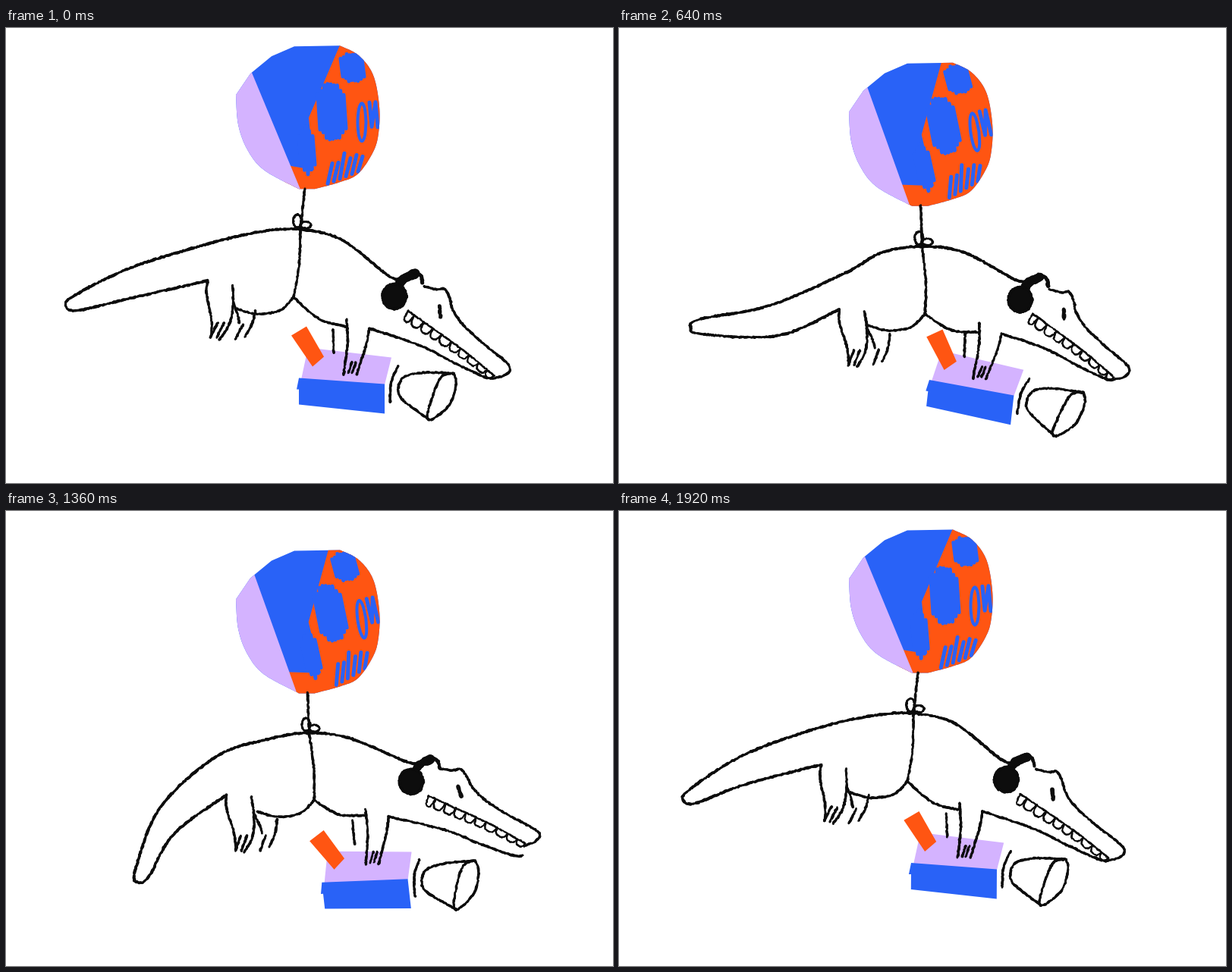
An HTML page with a canvas for the animation above (2000 ms loop, 800 by 600 pixels).

```html
<!DOCTYPE html>
<html lang="en">
<head>
<meta charset="utf-8">
<title>Floating crocodile</title>
<style>
html, body { margin: 0; width: 100%; height: 100%; overflow: hidden; background: #fff; }
canvas { display: block; width: 800px; height: 600px; }
</style>
</head>
<body>
<canvas id="stage" width="800" height="600"></canvas>
<script>
const ctx = document.getElementById('stage').getContext('2d');
const BLUE = '#2962f7', ORANGE = '#ff5512', LILAC = '#d4b3ff', INK = '#0d0d0d';
const LOOP = 2000, RAD = Math.PI / 180;

// Head outlines around the ear: shut along the snout axis, wide in stage axes.
const HEAD = {
  top: {
    shut: [26,-32, 42,-37, 51,-43, 64,-35, 73,-26, 94,-16, 128,-9, 174,-2, 177,11, 165,24],
    wide: [28,-20, 34,-23, 48,-27, 60,-26, 72,-26, 92,-28, 118,-33, 172,-45, 175,-40, 171,-27]
  },
  upperLip: { shut: [25,7, 60,9, 115,13, 165,20], wide: [40,28, 62,9, 120,-13, 171,-27] },
  lowerLip: { shut: [25,7, 60,18, 115,22, 165,24], wide: [40,28, 58,47, 105,74, 153,90] },
  chin: { shut: [64,37, 113,33, 155,28, 165,24], wide: [35,70, 80,87, 145,107, 153,90] },
  eye: { shut: [57,-20, 65,-9], wide: [50,-16, 64,-7] }
};

let seed;
const random = () => {
  seed = (seed * 1664525 + 1013904223) >>> 0;
  return seed / 4294967296;
};
const mix = (a, b, u) => a + (b - a) * u;
const mixPoint = (a, b, u) => [mix(a[0], b[0], u), mix(a[1], b[1], u)];
const shift = ([x, y], dx, dy) => [x + dx, y + dy];
const ramp = (t, from, to) => {
  const u = Math.min(1, Math.max(0, (t - from) / (to - from)));
  return u * u * (3 - 2 * u);
};

// Everything bobs once per loop; lags are degrees, the second pair adds an overtone.
function poseAt(t) {
  const phase = t / LOOP * 2 * Math.PI;
  const wave = (mid, size, lag = 0, size2 = 0, lag2 = 0) =>
    mid - size * Math.cos(phase - lag * RAD) + size2 * Math.cos(2 * phase - lag2 * RAD);
  const sin = Math.sin(phase), rise = (1 - Math.cos(phase)) / 2;
  const open = ramp(t, 740, 1040) * (1 - ramp(t, 1200, 1400));
  const knot = [wave(396, 8), wave(283, 17.5, 8)];
  return {
    open, knot, rise,
    ballTop: wave(41, 18, 10),
    belly: [wave(397, 18, 5), wave(372, 17, 8)],
    hind: [wave(283, 17), wave(361, 28, 4)],
    front: [479 + 42 * rise ** 1.5, 396 + 10 * rise],
    chest: shift(knot, 55, 14 - 9 * rise),
    waist: shift(knot, -53, 3 + 7 * rise),
    rump: shift(knot, wave(-115, 14, 300), wave(29, 10, -10)),
    back: [wave(190, 26, 5), wave(360, 46, 18)],
    under: [wave(200, 37, 10), wave(398, 43, 15)],
    tip: [wave(118, 54, 42, 9, 80), wave(420, 74, 45)],
    ear: [wave(526, 16, 0, 4, 60), 354 + 5 * sin ** 2 - 13 * open],
    headTurn: 30 + 4 * Math.sin(phase + 25 * RAD),
    headLen: 1.01 - .05 * sin,
    box: [wave(405, 21, 3, 4, 60), wave(472, 15, 55, 3, 130)],
    boxTurn: 4.5 * sin - 3 * Math.sin(2 * phase),
    hindTurn: 5 - 9 * rise,
    frontTurn: 4 * sin
  };
}

// Flat x, y list to points, stretched, turned and moved to an origin.
function place(flat, [ox, oy] = [0, 0], degrees = 0, stretch = 1) {
  const c = Math.cos(degrees * RAD), s = Math.sin(degrees * RAD);
  const points = [];
  for (let i = 0; i < flat.length; i += 2) {
    const x = flat[i] * stretch, y = flat[i + 1];
    points.push([ox + x * c - y * s, oy + x * s + y * c]);
  }
  return points;
}

// Smooth line through all points.
function curve(p) {
  const out = [p[0]];
  for (let i = 0; i < p.length - 1; i++) {
    const a = p[i - 1] || p[i], b = p[i], c = p[i + 1], d = p[i + 2] || c;
    const steps = Math.max(2, Math.ceil(Math.hypot(c[0] - b[0], c[1] - b[1]) / 2));
    for (let k = 1; k <= steps; k++) {
      const u = k / steps;
      out.push([0, 1].map(j => b[j] + .5 * u * (c[j] - a[j]
        + u * (2 * a[j] - 5 * b[j] + 4 * c[j] - d[j] + u * (3 * (b[j] - c[j]) + d[j] - a[j])))));
    }
  }
  return out;
}

function trace(points) {
  ctx.beginPath();
  points.forEach(p => ctx.lineTo(...p));
}

function fill(points, color) {
  trace(points);
  ctx.fillStyle = color;
  ctx.fill();
}

function stroke(points, color, width) {
  trace(points);
  ctx.strokeStyle = color;
  ctx.lineWidth = width;
  ctx.stroke();
}

// Crayon line: short pieces of uneven width.
function chalk(points, width = 3.6) {
  const wobble = () => (random() - .5) * .9;
  let last;
  for (const p of curve(points)) {
    const next = shift(p, wobble(), wobble());
    if (last) stroke([last, next], INK, width * (.6 + random() * .5));
    last = next;
  }
}

function oval([x, y], rx, ry) {
  const points = [];
  for (let a = 0; a <= 360; a += 45)
    points.push([x + rx * Math.cos(a * RAD), y + ry * Math.sin(a * RAD)]);
  return curve(points);
}

// Round patch hatched with up and down strokes.
function scribble(x, y, rx, ry, count) {
  const points = [];
  for (let i = 0; i <= count; i++) {
    const u = i / count * 2 - 1, half = ry * Math.sqrt(1 - .6 * u * u) - random() * 4;
    points.push([x + u * rx - 1, y - half], [x + u * rx + 2, y + half]);
  }
  stroke(points, BLUE, 5);
}

function turned(degrees, paint) {
  ctx.save();
  ctx.translate(399, 97);
  ctx.rotate(degrees * RAD);
  ctx.translate(-399, -97);
  paint();
  ctx.restore();
}

function drawBalloon({ ballTop, rise }) {
  ctx.save();
  ctx.translate(0, ballTop);
  const right = curve(place([440,0, 465,13, 484,39, 492,80, 491,115, 484,140, 464,169, 440,180, 407,189]));
  const left = curve(place([386,189, 340,164, 318,137, 306,104, 303,65]));
  trace([...right, ...left, ...place([322,37, 350,14, 380,1])]);
  ctx.clip();
  ctx.fillStyle = BLUE;
  ctx.fillRect(290, -10, 220, 220);
  turned(-11 * rise, () => {
    fill(place([444,-10, 399,95, 406,164, 360,156, 375,210, 520,210, 520,-20]), ORANGE);
    seed = 5;
    scribble(456, 29, 14, 20, 7);
    scribble(429, 87, 17, 38, 8);
    scribble(396, 138, 9, 32, 4);
    scribble(484, 91, 4, 30, 1);
    stroke(oval([469, 101], 5.5, 25), BLUE, 4);
    for (let x = 424; x < 470; x += 8) {
      const y = 182 - (x - 424) * .4;
      stroke([[x, y], [x + 6, y - 16 - random() * 18]], BLUE, 5);
    }
  });
  turned(4 * rise, () => fill(place([310,2, 389,192, 389,220, 280,220, 280,2]), LILAC));
  ctx.restore();
}

function drawMegaphone({ box, boxTurn }, marks) {
  const part = flat => place(flat, box, boxTurn);
  fill(part([12,-40, 122,-27, 113,9, 3,2]), LILAC);
  fill(part([0,0, 113,8, 113,47, 0,35, 0,15, -3,15]), BLUE);
  fill(part([-10,-56, 10,-68, 33,-28, 18,-15]), ORANGE);
  chalk(part([131,-16, 122,5, 120,32]));
  chalk(part([204,-6, 166,-7, 140,-2, 131,12, 136,28, 172,55]));
  chalk(part([204,-6, 207,8, 198,36, 174,55, 170,45, 186,1, 204,-6]));
  if (marks) {
    chalk(part([155,6, 159,4]));
    chalk(part([176,21, 180,17]), 4.5);
  }
}

function drawBody(p) {
  const root = mixPoint(p.back, p.under, .5);
  const tailTurn = Math.atan2(root[1] - p.tip[1], root[0] - p.tip[0]) / RAD;
  const [low, high] = place([14,10, 14,-10], p.tip, tailTurn);
  chalk([p.hind, p.under, low, p.tip, high, p.back, p.rump, p.waist, p.knot,
    p.chest, shift(p.ear, -6, -26), shift(p.ear, 10, -26)], 4);

  const stringTop = [394 + 5 * p.rise, p.ballTop + 188];
  chalk([stringTop, p.knot]);
  chalk(oval(shift(p.knot, -4, -11), 5.5, 8.5), 3);
  chalk(oval(shift(p.knot, 7, -6), 7, 4.5), 3);
  chalk([p.knot, shift(mixPoint(p.knot, p.belly, .55), 3, 0), p.belly]);
  chalk([p.belly, ...place([-18,17, -48,22, -75,15], p.belly)]);
  const breast = shift(p.front, -31, -2);
  chalk([p.belly, shift(mixPoint(p.belly, breast, .5), -1, 9), breast]);

  const leg = flat => chalk(place(flat, p.hind, p.hindTurn));
  leg([0,0, 0,18, 9,50, 11,73]);
  leg([33,3, 36,30, 33,56, 22,76]);
  leg([66,34, 63,52, 55,70]);
  leg([37,28, 43,41, 46,52]);
  for (const x of [18, 26, 51]) leg([x, 54, x - 8, 74]);

  const arm = flat => chalk(place(flat, p.front, p.frontTurn));
  arm([-30,-12, -29,20, -34,61]);
  arm([0,0, -5,24, -17,61]);
  arm([-48,2, -47,33]);
  for (const x of [-23, -18]) arm([x, 45, x - 5, 59]);
}

function teeth(lip, count, height) {
  const line = curve(lip), last = line.length - 1;
  for (let i = 0; i < count; i++) {
    const a = line[Math.floor(i / count * last)], b = line[Math.floor((i + 1) / count * last)];
    const dx = b[0] - a[0], dy = b[1] - a[1];
    const h = height * (1 - .5 * i / count) / Math.hypot(dx, dy);
    const corner = u => shift(mixPoint(a, b, u), -dy * h, dx * h);
    chalk([a, corner(.2), corner(.8), b], 2.6);
  }
}

function drawHead(p) {
  const shape = ({ shut, wide }) => {
    const b = place(wide, p.ear);
    return place(shut, p.ear, p.headTurn, p.headLen).map((a, i) => mixPoint(a, b[i], p.open));
  };
  const upper = shape(HEAD.upperLip), lower = shape(HEAD.lowerLip);
  chalk(shape(HEAD.top));
  chalk([p.front, ...shape(HEAD.chin)]);
  chalk(upper, 2.8);
  teeth(upper, 10, mix(12, 8, p.open));
  if (p.open > .2) {
    chalk(lower, 2.8);
    teeth(lower, 10, -8);
  }
  chalk(shape(HEAD.eye), 5.5);

  chalk(place([4,-12, 12,-23, 27,-30], p.ear), 12);
  chalk(place([24,-33, 34,-28, 37,-18], p.ear), 5);
  fill(oval(p.ear, 17, 17.5), INK);
  chalk(oval(p.ear, 16, 16.5));
}

function drawSparks(t) {
  const drift = (t - 1520) / 80;
  chalk(place([682,316, 683,319], [drift * 3, drift * -8]), 4);
  chalk(place([700,341, 706,335], [drift * 7, drift * -5]), 4);
}

function draw(now) {
  const raw = now % LOOP, step = raw >= 1680 && raw < 1760 ? 40 : 80;
  const t = Math.floor(raw / step) * step, pose = poseAt(t);
  const sparks = t >= 1440 && t <= 1600;
  ctx.lineCap = ctx.lineJoin = 'round';
  ctx.fillStyle = '#fff';
  ctx.fillRect(0, 0, 800, 600);
  drawBalloon(pose);
  seed = t * 7919 + 17;
  drawMegaphone(pose, sparks);
  drawBody(pose);
  drawHead(pose);
  if (sparks) drawSparks(t);
}

function play() {
  draw(performance.now());
  requestAnimationFrame(play);
}
play();
</script>
</body>
</html>
```
